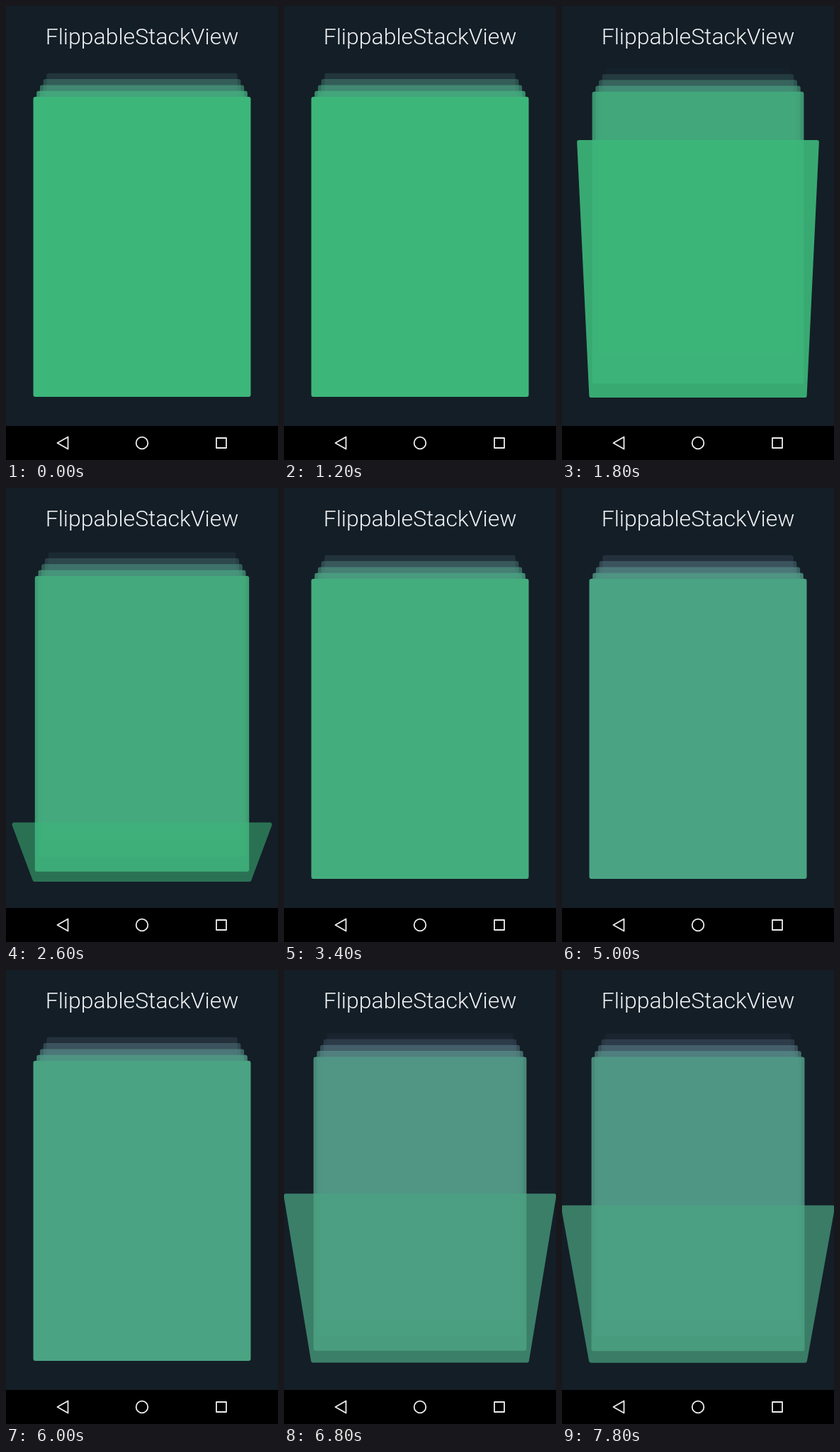
An HTML page with a canvas for the animation above (8000 ms loop, 384 px wide and 640 px high).

```html
<!DOCTYPE html>
<html lang="en">
<head>
<meta charset="utf-8">
<title>FlippableStackView</title>
<style>
  html, body { margin: 0; width: 100%; height: 100%; overflow: hidden; background: #141e27; }
  canvas { position: absolute; left: 0; top: 0; }
  h1 {
    position: absolute; left: 0; top: 23px; width: 384px; margin: 0;
    font: 300 32px/40px Roboto, sans-serif; color: #f0f3f4;
    text-align: center; white-space: nowrap;
  }
</style>
</head>
<body>
<canvas id="stage" width="384" height="640"></canvas>
<h1>FlippableStackView</h1>
<script>
const ctx = document.getElementById('stage').getContext('2d');
const LOOP = 8000;
const CENTER = 192, HALF = 153.5, TOP = 128, HEIGHT = 423;

// Scroll position in cards: [time in ms, position]
const scroll = [
  [0, 0], [1200, 0], [1400, .025], [1800, .13], [2600, .514], [3200, 1],
  [3600, 1], [4000, 1.205], [4400, 1.55], [4800, 1.96], [5000, 2],
  [6000, 2], [6400, 2.15], [6800, 2.328], [7800, 2.35], [8000, 2.35]
];

const slope = i => (scroll[i + 1][1] - scroll[i][1]) / (scroll[i + 1][0] - scroll[i][0]);

// Harmonic mean of the neighbouring slopes keeps the curve monotone.
function tangent(i) {
  if (i === 0 || i === scroll.length - 1) return 0;
  const a = slope(i - 1), b = slope(i);
  return a * b > 0 ? 2 * a * b / (a + b) : 0;
}

function positionAt(time) {
  let i = 0;
  while (i < scroll.length - 2 && time >= scroll[i + 1][0]) i++;
  const [t0, p0] = scroll[i], [t1, p1] = scroll[i + 1];
  const span = t1 - t0, u = (time - t0) / span;
  const ease = u * u * (3 - 2 * u);
  return p0 + (p1 - p0) * ease
    + span * u * (1 - u) * ((1 - u) * tangent(i) - u * tangent(i + 1));
}

const cardColor = i => `rgb(${61 + 6.5 * i}, ${182 - 9.5 * i}, ${122 + 4.1 * i})`;

function drawCard(index, alpha, top, topHalf, bottom, bottomHalf) {
  const radius = Math.min(3, (bottom - top) / 4);
  const corners = [
    [CENTER + topHalf, top], [CENTER + bottomHalf, bottom],
    [CENTER - bottomHalf, bottom], [CENTER - topHalf, top]
  ];
  ctx.globalAlpha = alpha;
  ctx.fillStyle = cardColor(index);
  ctx.beginPath();
  ctx.moveTo(CENTER, top);
  corners.forEach(([x, y], i) => {
    const [nextX, nextY] = corners[i + 1] || [CENTER, top];
    ctx.arcTo(x, y, nextX, nextY, radius);
  });
  ctx.closePath();
  ctx.fill();
  ctx.globalAlpha = 1;
}

function drawStacked(index, depth) {
  const half = HALF - 4.7 * depth;
  const top = TOP - 8.3 * depth;
  drawCard(index, Math.max(0, 1 - .2 * depth), top, half, top + HEIGHT * half / HALF, half);
}

// The front card tips forward around its bottom edge.
function drawFlipping(index, progress) {
  const fall = 400 * progress + 520 * progress ** 2;
  const u = fall / 427;
  if (u >= 1) return;
  const widen = 40.5 * Math.sin(Math.PI * u - .52 * u ** 3);
  const alpha = Math.min(1, 1.04 - .95 * progress);
  drawCard(index, alpha, TOP + fall, HALF + widen, TOP + HEIGHT + 8 * progress, HALF);
}

function drawNavigation() {
  ctx.fillStyle = '#000';
  ctx.fillRect(0, 592, 384, 48);
  ctx.strokeStyle = '#eee';
  ctx.lineWidth = 1.8;
  ctx.lineJoin = 'round';
  ctx.beginPath();
  ctx.moveTo(72.5, 616);
  ctx.lineTo(87.5, 607.5);
  ctx.lineTo(87.5, 624.5);
  ctx.closePath();
  ctx.moveTo(200.3, 616);
  ctx.arc(192, 616, 8.3, 0, 2 * Math.PI);
  ctx.rect(297, 609, 14, 14);
  ctx.stroke();
}

function frame(now) {
  const position = positionAt(now % LOOP);
  const front = Math.floor(position), progress = position - front;
  ctx.fillStyle = '#141e27';
  ctx.fillRect(0, 0, 384, 640);
  for (let i = 5; i > 0; i--) drawStacked(front + i, i - progress);
  drawFlipping(front, progress);
  drawNavigation();
  requestAnimationFrame(frame);
}
requestAnimationFrame(frame);
</script>
</body>
</html>
```
